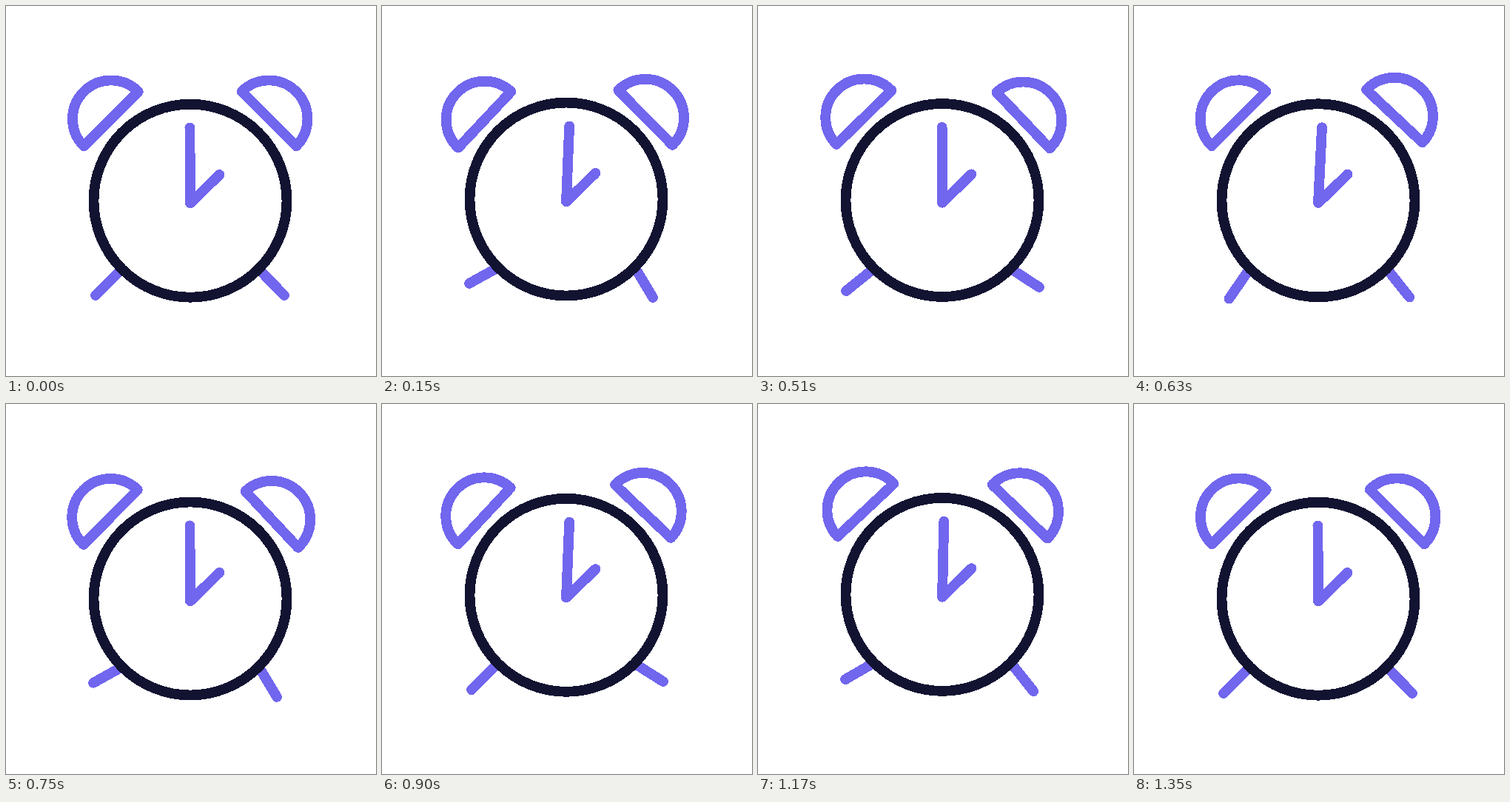
An HTML page that plays this animation: 500 by 500 pixels, repeating every 1.51 s.

```html
<!DOCTYPE html>
<html lang="en">
<head>
<meta charset="utf-8">
<title>Alarm clock</title>
<style>
  html, body { margin: 0; width: 100%; height: 100%; overflow: hidden; background: #fff; }
  svg { display: block; width: 100vw; height: 100vh; }
  path, circle {
    fill: none; stroke: #7166ee; stroke-width: 13.8;
    stroke-linecap: round; stroke-linejoin: round; shape-rendering: crispEdges;
  }
  .ring { stroke: #121331; }
</style>
</head>
<body>
<svg viewBox="0 0 500 500">
  <g id="clock">
    <path id="legL"/>
    <path id="legR"/>
    <circle class="ring" cx="249" cy="263.2" r="130.5"/>
    <path id="bellL" d="M178.8 115.7A52 52 0 0 0 105.2 189.3Z"/>
    <path id="bellR" d="M318.6 115.7A52 52 0 0 1 392.2 189.3Z"/>
    <path d="M249 266.5L288.5 228"/>
    <path id="hand" d="M249 266.5L248.4 164.5"/>
  </g>
</svg>
<script>
const LOOP = 1510, STEP = 30, LAST = 45, FADE = 3;
const $ = id => document.getElementById(id);

// Everything shakes up from rest and settles back at the end
const fade = n => Math.min(1, n / FADE, (LAST - n) / FADE);

// Sine that lingers at its extremes; rate in turns per step
function wave(n, rate, phase) {
  const s = Math.sin(2 * Math.PI * (rate * n + phase));
  return s * (3 - s * s) / 2;
}
const swing = (n, rate, phase) => fade(n) * wave(n, rate, phase);
const pulse = (n, rate, phase) => fade(n) * (1 + wave(n, rate, phase)) / 2;

const rotate = (id, deg, x, y) =>
  $(id).setAttribute('transform', `rotate(${deg} ${x} ${y})`);

// The foot follows a shallow curve around its resting point
function leg(id, hip, rest, slope, bend, s) {
  const [x, y] = rest.map((v, i) => v + s * slope[i] + s * s * bend[i]);
  $(id).setAttribute('d', `M${hip}L${x} ${y}`);
}

function draw(time) {
  const n = Math.min(LAST, Math.floor(time % LOOP / STEP));
  const lift = -5.8 * pulse(n, 11 / LAST, -0.25);
  $('clock').setAttribute('transform', `translate(0 ${lift})`);
  rotate('hand', 3.2 * pulse(n, 0.12, -0.18), 249, 266.5);
  rotate('bellL', 2 * swing(n, 0.368, -0.22), 249, 263);
  rotate('bellR', 2 * swing(n, 0.116, 0.435), 249, 263);
  leg('legL', [156, 356], [121, 391], [-5.5, -9.5], [2.5, -4.5], swing(n, 0.15, 0.5));
  leg('legR', [342, 356], [376, 391], [7, -8], [-3, -3], swing(n, 0.3, 0.25));
}

const start = performance.now();
function tick() {
  draw(performance.now() - start);
  requestAnimationFrame(tick);
}
tick();
</script>
</body>
</html>
```
